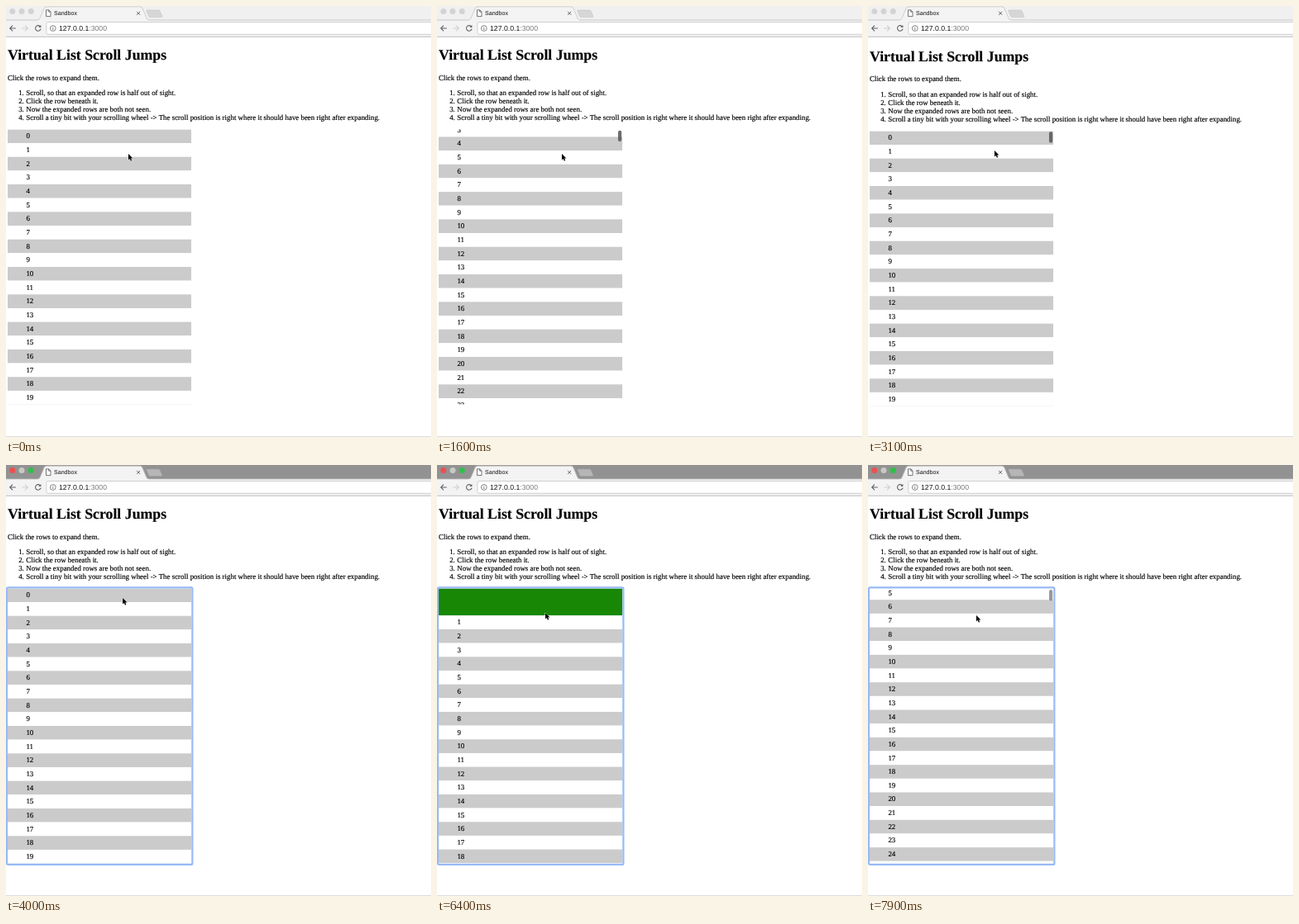
These frames come from a looping animation (514 by 522 pixels, 8 s). An HTML page:

```html
<!DOCTYPE html>
<html lang="en">
<head>
<meta charset="utf-8">
<title>Sandbox</title>
<style>
  html, body { margin: 0; width: 100%; height: 100%; overflow: hidden; background: #fff; }
  svg { display: block; width: 514px; height: 522px; text-rendering: geometricPrecision; }
  .page { font: 8.9px "Liberation Serif", Times, serif; }
  .page text { stroke: #000; stroke-width: .15; }
  .page .title { font-size: 17.8px; font-weight: bold; }
  .ui { font-family: "Liberation Sans", Arial, sans-serif; }
  .num { text-anchor: end; }
  .strip { fill: #f0f0f0; }
  .plus { fill: #d6d6d6; stroke: #c4c4c4; }
  .light { fill: #d3d3d3; }
  .ring { visibility: hidden; }
  .focused .strip { fill: #929292; }
  .focused .plus { fill: #b6b6b6; stroke: #a0a0a0; }
  .focused .light { fill: var(--c); }
  .focused .ring { visibility: visible; }
</style>
</head>
<body>
<svg id="stage" viewBox="0 0 514 522">
  <defs>
    <clipPath id="view"><rect x="2" y="149.4" width="222.3" height="333.2"/></clipPath>
  </defs>
  <rect width="514" height="522" fill="#fff"/>

  <g class="page" id="page">
    <text class="title" x="2" y="65">Virtual List Scroll Jumps</text>
    <text x="2" y="89.5">Click the rows to expand them.</text>
    <g id="steps"></g>
    <g clip-path="url(#view)">
      <g id="rows"></g>
      <rect id="thumb" x="219" width="4.2" height="13.5" rx="2.1" fill="#555"/>
    </g>
    <rect class="ring" x="1" y="148.3" width="224.4" height="335.6" rx="1.5" fill="none" stroke="#98baf5" stroke-width="2.2"/>
  </g>
  <path d="M0 521.5H514" stroke="#dcdcdc"/>

  <g class="ui">
    <rect class="strip" width="514" height="18"/>
    <circle class="light" style="--c:#ee4f50" cx="7.8" cy="6.6" r="3.5"/>
    <circle class="light" style="--c:#c9c9c4" cx="19" cy="6.6" r="3.5"/>
    <circle class="light" style="--c:#2fc04a" cx="30.3" cy="6.6" r="3.5"/>
    <rect y="17" width="514" height="20" fill="#f3f3f3"/>
    <path d="M0 17H37.5Q40 17 41 15L46 3Q47 1 49 1H162Q164 1 165 3L170 15Q171 17 173.5 17H514" fill="none" stroke="#bdbdbd" stroke-width=".8"/>
    <path d="M38 17.6Q40.5 17 41.4 15L46.4 3.2Q47.2 1.4 49 1.4H162Q163.8 1.4 164.6 3.2L169.6 15Q170.5 17 173 17.6Z" fill="#f3f3f3"/>
    <path class="plus" d="M170.5 5H184.5Q185.7 5 186.2 6.2L188.8 12.2Q189.2 13.6 188 13.6H174.5Q173.2 13.6 172.7 12.4L169.9 6.2Q169.5 5 170.5 5Z" stroke-width=".6"/>
    <path d="M48.5 4.8H51.7L54 7.1V12.6H48.5ZM51.7 4.8V7.1H54" fill="#fff" stroke="#555" stroke-width=".8"/>
    <text x="58" y="11.4" font-size="7.1" fill="#111">Sandbox</text>
    <path d="M158.2 6.8L162.2 10.8M162.2 6.8L158.2 10.8" stroke="#555" stroke-width=".9"/>

    <g fill="none" stroke="#626262" stroke-width="1.1">
      <path d="M11.8 27H4.8M8 23.7L4.7 27L8 30.3"/>
      <path d="M19.2 27H26.2M23 23.7L26.3 27L23 30.3" stroke="#cfcfcf"/>
      <path d="M41.3 24.7A3.3 3.3 0 1 0 42.1 27.6"/>
      <path d="M42.4 23V26H39.4Z" fill="#626262" stroke="none"/>
    </g>
    <rect x="48.9" y="19.5" width="480" height="14.8" rx="2" fill="#fff" stroke="#c6c6c6" stroke-width=".8"/>
    <circle cx="56.8" cy="27" r="3.4" fill="none" stroke="#666" stroke-width=".8"/>
    <path d="M56.8 26.5V29M56.8 24.9V25.7" stroke="#666" stroke-width=".9"/>
    <text x="64" y="30.1" font-size="8.7" fill="#111">127.0.0.1<tspan fill="#777">:3000</tspan></text>
    <path d="M0 37.3H514" stroke="#b9b9b9" stroke-width=".9"/>
  </g>

  <path id="cursor" d="M0 0V7.6L1.7 6L2.9 8.7L4.2 8.1L3 5.5H5.4Z" stroke="#fff" stroke-width=".9" paint-order="stroke" stroke-linejoin="round"/>
</svg>
<script>
const LOOP = 8000, STEP = 100, ROW = 16.66, TOP = 149.4, GROWTH = 16.3;
const FOCUS_AT = 4000, EXPAND_AT = 5400;
const $ = id => document.getElementById(id);

function add(parent, tag, attrs, text) {
  const el = document.createElementNS("http://www.w3.org/2000/svg", tag);
  for (const k in attrs) el.setAttribute(k, attrs[k]);
  if (text !== undefined) el.textContent = text;
  parent.append(el);
  return el;
}

[
  "Scroll, so that an expanded row is half out of sight.",
  "Click the row beneath it.",
  "Now the expanded rows are both not seen.",
  "Scroll a tiny bit with your scrolling wheel -> The scroll position is right where it should have been right after expanding."
].forEach((line, i) => {
  const y = 108.4 + i * 10;
  add($("steps"), "text", { x: 21.8, y, class: "num" }, i + 1 + ".");
  add($("steps"), "text", { x: 24.3, y }, line);
});

// Rows after the first share one group, so that expanding shifts them together.
const first = add($("rows"), "g", {});
const rest = add($("rows"), "g", {});
for (let i = 0; i < 32; i++) {
  const g = i ? rest : first, y = TOP + i * ROW;
  add(g, "rect", { x: 2, y, width: 222.3, height: ROW, fill: i % 2 ? "#fff" : "#cbcbcb" });
  add(g, "text", { x: 24.4, y: y + 11 }, i);
}
const [firstBox, firstLabel] = first.children;

// Progress from 0 to 1 between two times.
const ramp = (t, from, to) => Math.min(1, Math.max(0, (t - from) / (to - from)));
const smooth = k => k * k * (3 - 2 * k);
const easeOut = k => 1 - (1 - k) ** 2.1;

const scrollAt = t =>
  57.6 * (easeOut(ramp(t, 600, 1600)) - smooth(ramp(t, 2500, 3000))) +
  102.4 * ramp(t, 7600, 7900) ** 2;

const bounceAt = t => 2.1 * Math.sin(Math.PI * ramp(t, 2900, 3400));

const thumbAt = t =>
  .85 * (ramp(t, 600, 700) - ramp(t, 2000, 2300) + ramp(t, 2500, 2600) - ramp(t, 3500, 3800)) +
  .6 * ramp(t, 7600, 7900);

// Pointer strokes: start, end, dx, dy.
const strokes = [
  [0, 200, 3, 0],
  [2000, 2300, 2, -4],
  [3400, 4300, -16, -19],
  [5800, 6700, -8, 31],
  [7200, 7400, 2, -5]
];
const pointerAt = t => strokes.reduce(([x, y], [from, to, dx, dy]) => {
  const k = smooth(ramp(t, from, to));
  return [x + dx * k, y + dy * k];
}, [148, 179]);

const move = (el, x, y) => el.setAttribute("transform", `translate(${x} ${y})`);

function draw(now) {
  const t = Math.floor(now % LOOP / STEP) * STEP;
  const open = t >= EXPAND_AT;
  const y = scrollAt(t);
  $("stage").classList.toggle("focused", t >= FOCUS_AT);
  move($("page"), 0, bounceAt(t));
  move($("rows"), 0, -y);
  move(rest, 0, open ? GROWTH : 0);
  firstBox.setAttribute("height", open ? ROW + GROWTH : ROW);
  firstBox.setAttribute("fill", open ? "#178705" : "#cbcbcb");
  firstLabel.setAttribute("visibility", open ? "hidden" : "visible");
  $("thumb").setAttribute("y", 150.3 + y * .006);
  $("thumb").setAttribute("opacity", thumbAt(t));
  move($("cursor"), ...pointerAt(t));
}

const start = performance.now();
(function tick() {
  draw(performance.now() - start);
  requestAnimationFrame(tick);
})();
</script>
</body>
</html>
```
